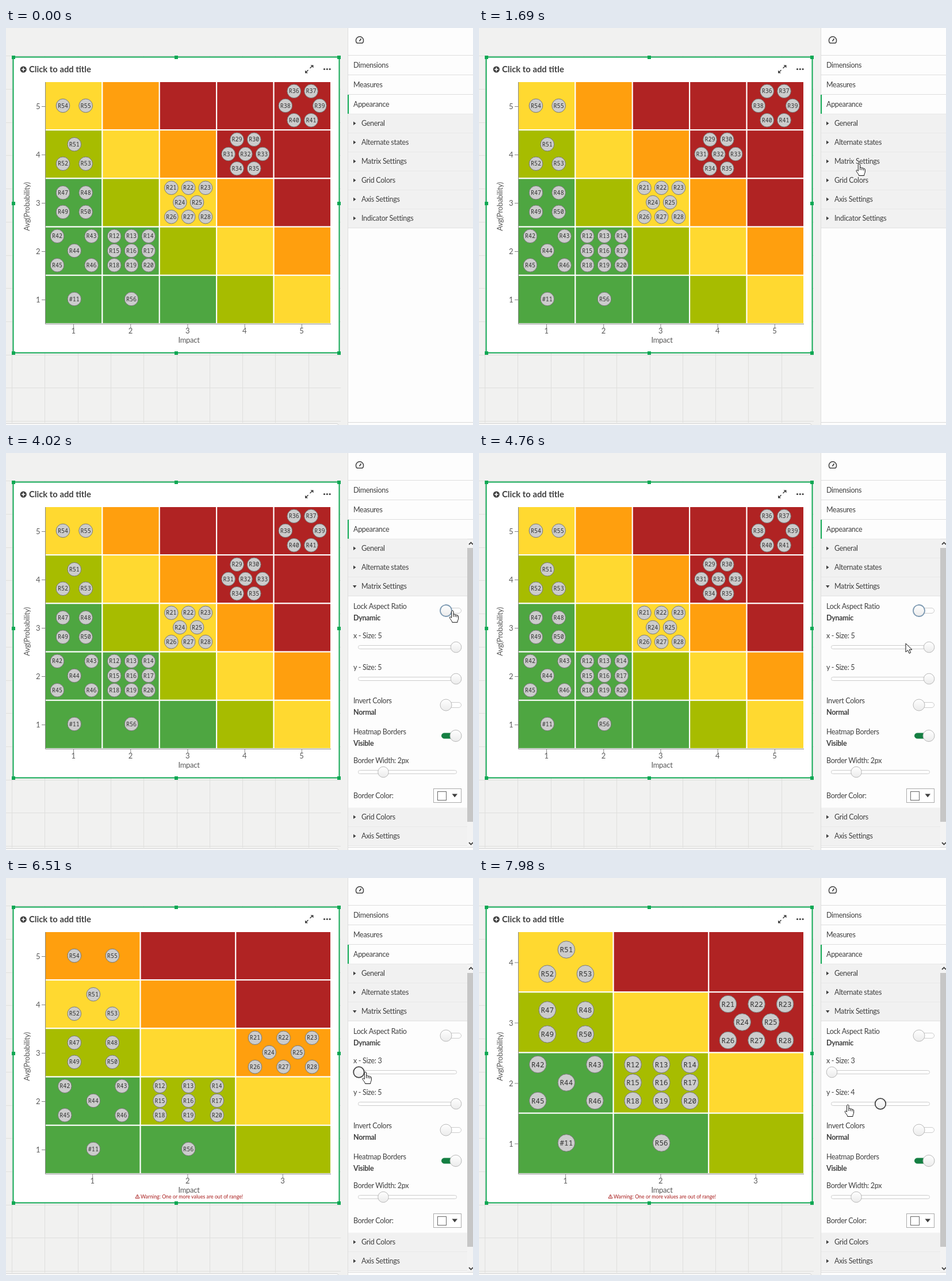
Recreate the animation shown at these times as an HTML page. Size 812 px wide and 690 px high, loop 8 s.

```html
<!DOCTYPE html>
<html lang="en">
<head>
<meta charset="utf-8">
<title>Risk matrix settings</title>
<style>
html, body { margin: 0; width: 100%; height: 100%; overflow: hidden; background: #f1f1f0; }
svg { display: block; width: 812px; height: 690px; }
text { font: 12.5px Lato, "Open Sans", sans-serif; letter-spacing: -.3px; fill: #404040; }
.b { font-weight: 700; }
.title { font-size: 14.8px; font-weight: 700; letter-spacing: 0; }
.axis { font-size: 13px; fill: #595959; text-anchor: middle; }
.warn { font-size: 8.8px; letter-spacing: 0; fill: #a81c1c; }
.id { font-family: "Noto Sans Mono", "DejaVu Sans Mono", monospace; letter-spacing: 0; text-anchor: middle; fill: #333; }
</style>
</head>
<body>
<svg viewBox="0 0 812 690" xmlns="http://www.w3.org/2000/svg">
  <defs>
    <linearGradient id="knob" x2="0" y2="1"><stop stop-color="#fff"/><stop offset="1" stop-color="#ebebeb"/></linearGradient>
    <clipPath id="scroll"><path d="M595 149H812V684H595Z"/></clipPath>
    <clipPath id="fold"><rect id="foldBox" x="595" y="248" width="217" height="0"/></clipPath>
  </defs>
  <g id="stage"></g>
  <g id="chart"></g>
  <g id="panel"></g>
  <g id="cursor" stroke="#111" stroke-linejoin="round">
    <path id="arrow" fill="#fff" d="M0 0V15L3.6 11.7L6 17.2L8.6 16L6.2 10.8H11Z"/>
    <g id="hand">
      <path fill="#fff" d="M-1.7 1.6C-1.7-.2 1.7-.2 1.7 1.6V7C2.4 6 4.6 6.2 4.8 7.6C5.6 6.8 7.5 7.2 7.7 8.5C8.7 7.9 10.3 8.5 10.3 10V14C10.3 16 8.6 17.4 8.6 20.5H-.4C-.6 18-3.6 15.6-5 12.6C-5.6 10.8-3.4 10.2-1.7 12.6Z"/>
      <path fill="none" d="M1.7 7V11M4.8 7.6V11.2M7.7 8.5V11.6"/>
    </g>
  </g>
</svg>
<script>
const LOOP = 8000, FOLD = 368;
const $ = id => document.getElementById(id);
const clamp = v => Math.max(0, Math.min(1, v));
const ease = u => u * u * (3 - 2 * u);

const rect = (x, y, w, h, fill, more = '') => `<rect x="${x}" y="${y}" width="${w}" height="${h}" fill="${fill}" ${more}/>`;
const path = (d, stroke, w = 1, fill = 'none') => `<path d="${d}" stroke="${stroke}" stroke-width="${w}" fill="${fill}"/>`;
const disc = (x, y, r, fill, stroke = 'none', w = 1) => `<circle cx="${x}" cy="${y}" r="${r}" fill="${fill}" stroke="${stroke}" stroke-width="${w}"/>`;
const text = (x, y, s, cls = '', more = '') => `<text x="${x}" y="${y}" class="${cls}" ${more}>${s}</text>`;

// ---- background and chart frame
function drawStage() {
  let s = rect(0, 0, 812, 690, '#f1f1f0'), lines = '';
  for (let i = 0; i < 12; i++) lines += `M0 ${Math.round(683 - i * 57.7) + .5}H582`;
  for (let i = 0; i < 10; i++) lines += `M${Math.round(10 + i * 57.3) + .5} 49V686`;
  s += path(lines, '#dfdfdd');
  s += path('M-5 695V687.5H574Q578.5 687.5 578.5 692', '#d2d2d2', 1, '#fbfbfb');
  s += rect(12.5, 50.5, 567, 514, '#fff', 'stroke="#10a854" stroke-width="2"');
  for (const x of [13, 296, 579]) for (const y of [51, 305, 565])
    if (x !== 296 || y !== 305) s += rect(x - 3, y - 3, 6, 6, '#10a854');
  s += disc(30.2, 72, 5.6, '#404040') + path('M27 72H33.4M30.2 68.8V75.2', '#fff', 1.6);
  s += text(40, 77, 'Click to add title', 'title');
  s += path('M528.5 70L532.5 66M525.5 73L521.5 77', '#404040', 1.5);
  s += path('M529.5 64.5H534.5V69.5ZM520 73.5V78.5H525Z', 'none', 0, '#404040');
  for (const x of [553.5, 558.3, 563.1]) s += disc(x, 71.5, 1.6, '#404040');
  return s;
}

// ---- heat map
const COLORS = { G: '#4ea641', L: '#a7bc00', Y: '#ffd930', O: '#ff9f0e', R: '#b02323' };
const HEAT = {
  '5x5': 'YORRR LYORR GLYOR GGLYO GGGLY',
  '4x5': 'YORR YYOR LYYO GLYY GGLY',
  '3x5': 'ORR YOR LYO GLY GGL',
  '3x4': 'YRR LYR GLY GGL'
};
// column, row, first number, row layout
const RISKS = [
  [1, 1, 11, '1'], [2, 1, 56, '1'], [2, 2, 12, '333'], [3, 3, 21, '323'], [4, 4, 29, '232'],
  [5, 5, 36, '2W2'], [1, 2, 42, 'W1W'], [1, 3, 47, 'ww'], [1, 4, 51, '1w'], [1, 5, 54, 'w']
];
const SPREAD = { 1: [0], 2: [-.15, .15], w: [-.2, .2], W: [-.3, .3], 3: [-.3, 0, .3] };

function drawChart(cols, rows, square) {
  const W = square ? 420 : 496, H = 420, x0 = square ? 107 : 69, y0 = 94;
  const w = W / cols, h = H / rows, r = h / 7, bottom = y0 + H;
  // cells reach one pixel further, so their white outline frames the plot
  const cw = (W + 1) / cols, ch = (H + 1) / rows;
  let s = '', ticks = '', labels = '';
  HEAT[cols + 'x' + rows].split(' ').forEach((line, j) => [...line].forEach((c, i) => {
    s += rect(x0 - 1 + i * cw, y0 - 1 + j * ch, cw, ch, COLORS[c], 'stroke="#fff" stroke-width="2"');
  }));
  for (let i = 1; i <= cols; i++) {
    const x = x0 - 1 + (i - .5) * w;
    ticks += `M${x} 515V521`;
    labels += text(x - .5, 531, i, 'axis');
  }
  for (let j = 1; j <= rows; j++) {
    const y = bottom + .5 - (j - .5) * h;
    ticks += `M${x0 - 7} ${y}H${x0 - 1}`;
    labels += text(x0 - 13.5, y + 4.5, j, 'axis');
  }
  s += path(`M${x0 - .5} 94V514.5H${x0 + W}` + ticks, '#858585') + labels;
  s += text(x0 + W / 2 + (square ? 0 : 1), 547, 'Impact', 'axis');
  s += text(0, 0, 'Avg(Probability)', 'axis', `transform="translate(${x0 - 28} 310.5) rotate(-90)"`);

  for (const [col, row, first, layout] of RISKS) {
    if (col > cols || row > rows) continue;
    let n = first;
    [...layout].forEach((key, k) => {
      const dy = (k - (layout.length - 1) / 2) * (layout.length === 3 ? .3 : .4);
      for (const dx of SPREAD[key]) {
        const x = x0 + .2 + (col - .5 + dx) * w, y = bottom - 1 - (row - .5 - dy) * h;
        s += disc(x, y, r - .2, '#ccc', '#777');
        s += text(x, y + r * .3, (n === 11 ? '#' : 'R') + n++, 'id', `style="font-size:${r * .84}px"`);
      }
    });
  }
  if (cols < 5 || rows < 5) {
    s += path('M228.5 550L232 556.5H225ZM228.5 552.3V554.3M228.5 555V555.8', '#a81c1c', .9);
    s += text(234, 556.5, 'Warning: One or more values are out of range!', 'warn');
  }
  return s;
}

// ---- property panel
function header(y, label, open, width) {
  const tri = open ? `M603 ${y - 2}H609.5L606.2 ${y + 2.5}Z` : `M604 ${y - 3.5}V${y + 3}L608.5 ${y - .2}Z`;
  return rect(595, y - 16.5, width, 33, '#f1f1f1') + path(`M595 ${y + 16.5}H${595 + width}`, '#e1e1e1') +
    path(tri, 'none', 0, '#404040') + text(618, y + 4, label);
}
function toggle(y, label, state, on, focus, green) {
  return text(604, y - 3, label) + text(604, y + 17, state, 'b') +
    rect(757.5, y - 4.5, 34, 9, on ? green : '#fff', `rx="4.5" stroke="${on ? green : '#ccc'}"`) +
    disc(on ? 782 : 765, y, 10, 'url(#knob)', focus ? '#7f9bb3' : '#b8b8b8', focus ? 1.8 : 1);
}
function slider(y, label, x, focus) {
  return text(604, y - 16, label) + rect(612.5, y - 3, 171, 6, '#fff', 'rx="3" stroke="#ccc"') +
    disc(x, y, 9.3, 'url(#knob)', focus ? '#444' : '#b8b8b8', focus ? 1.8 : 1);
}
function drawPanel(st) {
  const shift = FOLD * st.fold, bar = shift > 337, width = bar ? 207 : 217;
  let s = rect(595, 0, 217, 690, '#fdfdfd');
  s += path('M594.5 0V690M595 47.5H812M595 81.5H812M595 115.5H812M595 149.5H812', '#dedede');
  s += path('M610.3 26.3A6.6 6.6 0 1 1 619.7 26.3Z', '#404040', 1.5) + path('M614.5 23L617.5 18.5', '#404040', 1.8);
  ['Dimensions', 'Measures', 'Appearance'].forEach((t, i) => s += text(604, 68.5 + i * 34, t));
  s += rect(594, 116, 2, 33, '#10a854');

  s += '<g clip-path="url(#scroll)">';
  s += header(166, 'General', false, width) + header(199, 'Alternate states', false, width);
  s += header(232, 'Matrix Settings', st.fold > 0, width);
  if (st.fold > 0) {
    s += '<g clip-path="url(#fold)">' +
      toggle(274, 'Lock Aspect Ratio', st.lock ? 'Locked' : 'Dynamic', st.lock, st.focus === 'lock', '#009845') +
      slider(337.5, 'x - Size: ' + st.cols, st.xKnob, st.focus === 'x') +
      slider(392.5, 'y - Size: ' + st.rows, st.yKnob, st.focus === 'y') +
      toggle(438, 'Invert Colors', 'Normal', false, false) +
      toggle(491.5, 'Heatmap Borders', 'Visible', true, false, '#147f42') +
      slider(554.5, 'Border Width: 2px', 656, false) +
      text(604, 600, 'Border Color:') +
      rect(743.5, 583.5, 48, 24, '#fff', 'stroke="#aaa"') +
      rect(750.5, 588.5, 15, 15, '#fff', 'stroke="#666"') +
      path('M775.5 592.5H785L780.2 598.5Z', 'none', 0, '#404040') + '</g>';
  }
  ['Grid Colors', 'Axis Settings', 'Indicator Settings'].forEach((t, i) => s += header(265 + i * 33 + shift, t, false, width));
  s += '</g>';
  if (bar) {
    s += rect(802, 150, 10, 535, '#f3f3f3') + rect(802, 165, 10, 476, '#c6c6c6');
    s += path('M805 159L808.5 155.5L812 159M805 677L808.5 680.5L812 677', '#444', 1.8);
  }
  return s + path('M595 685.5H812', '#d9d9d9');
}

// ---- timeline
const MOVES = [
  [390, 776, 690], [1450, 661, 236], [2160, 661, 236], [2950, 778, 271], [3920, 778, 271],
  [4700, 742, 331], [4780, 742, 331], [5050, 727, 338], [5410, 726, 339], [6200, 625, 337],
  [6540, 625, 337], [7200, 735, 393], [7450, 735, 393], [8000, 641, 394]
];
function pointer(t) {
  const i = Math.max(1, MOVES.findIndex(m => m[0] > t));
  const [t0, x0, y0] = MOVES[i - 1], [t1, x1, y1] = MOVES[i];
  const u = ease(clamp((t - t0) / (t1 - t0)));
  const dip = t0 === 5410 ? 14 * Math.sin(Math.PI * u) : 0;
  return [x0 + (x1 - x0) * u, y0 + (y1 - y0) * u + dip];
}
function stateAt(t) {
  return {
    fold: clamp((t - 1730) / 130),
    lock: t >= 2980 && t < 3920,
    square: t >= 3050 && t < 3950,
    cols: t < 5150 ? 5 : t < 6430 ? 4 : 3,
    rows: t < 7450 ? 5 : 4,
    xKnob: t < 5100 ? 782.5 : t < 6240 ? 698 : 613.5,
    yKnob: t < 7390 ? 782.5 : 698,
    focus: t < 2980 ? '' : t < 5100 ? 'lock' : t < 7390 ? 'x' : 'y'
  };
}

let chartKey, panelKey;
function render(t) {
  const st = stateAt(t);
  const ck = [st.cols, st.rows, st.square].join(), pk = JSON.stringify(st);
  if (ck !== chartKey) $('chart').innerHTML = drawChart(st.cols, st.rows, st.square);
  if (pk !== panelKey) {
    $('foldBox').setAttribute('height', FOLD * st.fold);
    $('panel').innerHTML = drawPanel(st);
  }
  chartKey = ck;
  panelKey = pk;

  const [x, y] = pointer(t);
  const hand = st.fold ? y < 248 || (x > 754 && Math.abs(y - 274) < 12) || Math.abs(y - 338) < 6 || Math.abs(y - 393) < 6 : y < 347;
  $('cursor').setAttribute('transform', `translate(${x.toFixed(1)} ${y.toFixed(1)})`);
  $('cursor').style.display = t < 390 ? 'none' : '';
  $('hand').style.display = hand ? '' : 'none';
  $('arrow').style.display = hand ? 'none' : '';
}

$('stage').innerHTML = drawStage();
const start = performance.now();
(function tick() {
  render((performance.now() - start) % LOOP);
  requestAnimationFrame(tick);
})();
</script>
</body>
</html>
```
